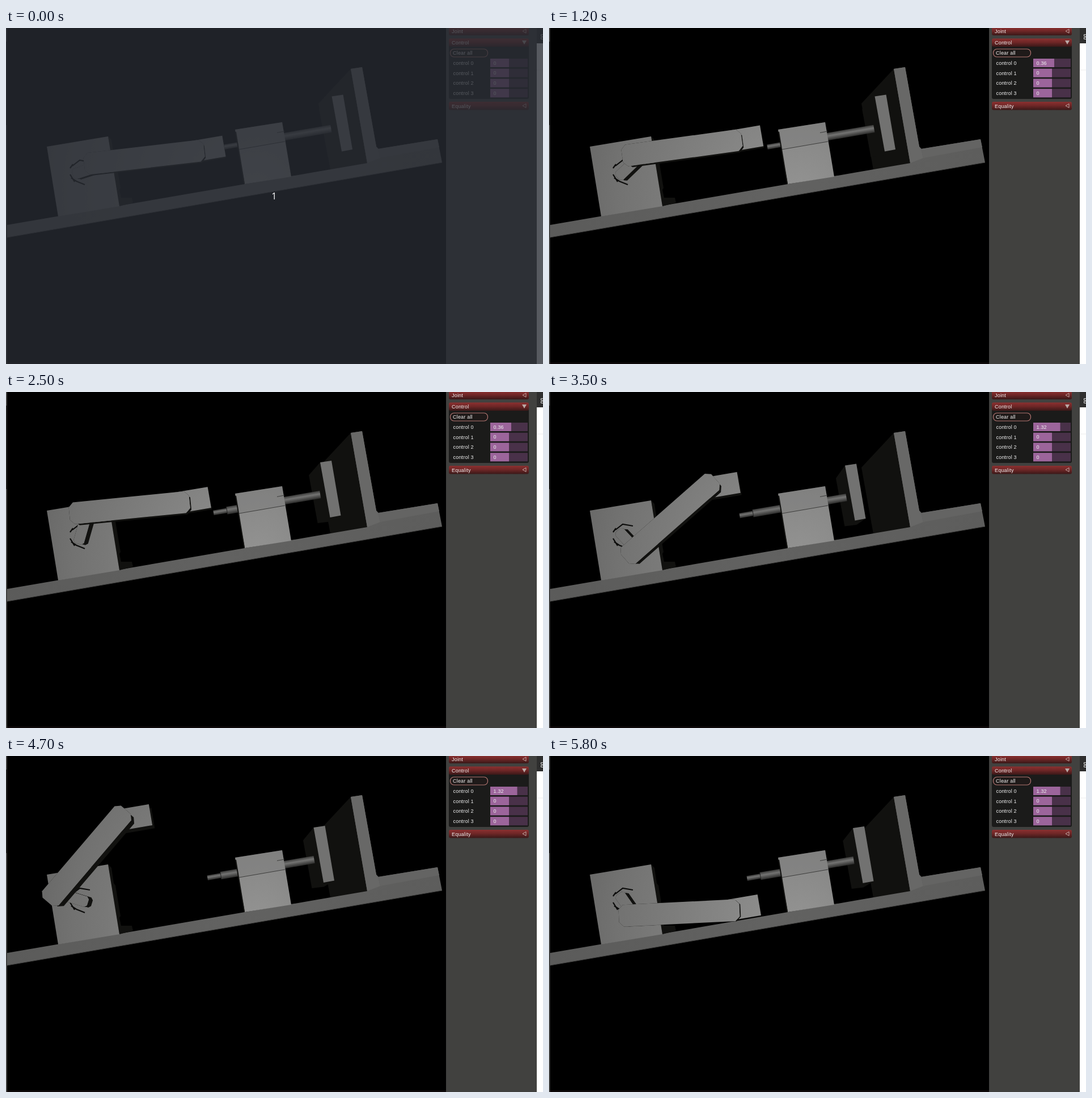
An HTML page that plays this animation: 947 by 592 pixels, repeating every 6 s.

```html
<!DOCTYPE html>
<html lang="en">
<head>
<meta charset="utf-8">
<title>Slider crank</title>
<style>
html, body { margin: 0; width: 100%; height: 100%; overflow: hidden; background: #000; }
svg { display: block; width: 947px; height: 592px; }
text { font: 9px "Liberation Sans", Arial, sans-serif; letter-spacing: .2px; fill: #f0f0f0; }
.dark { fill: #11110f; }
.lit { fill: url(#light); }
.hub { fill: none; stroke: #0c0c0b; stroke-width: 2.2; }
</style>
</head>
<body>
<svg viewBox="0 0 947 592" xmlns="http://www.w3.org/2000/svg">
  <defs>
    <radialGradient id="light" gradientUnits="userSpaceOnUse" cx="440" cy="290" r="460">
      <stop offset="0" stop-color="#939392"/>
      <stop offset=".3" stop-color="#858584"/>
      <stop offset=".7" stop-color="#727271"/>
      <stop offset="1" stop-color="#5e5e5d"/>
    </radialGradient>
    <linearGradient id="floor" x1="0" x2="1" y1="0" y2="0">
      <stop offset="0" stop-color="#5b5b5a"/>
      <stop offset=".5" stop-color="#626261"/>
      <stop offset="1" stop-color="#5d5d5c"/>
    </linearGradient>
    <linearGradient id="rod" x1="0" x2="0" y1="0" y2="1">
      <stop offset="0" stop-color="#3a3a39"/>
      <stop offset=".4" stop-color="#747473"/>
      <stop offset="1" stop-color="#2b2b2a"/>
    </linearGradient>
    <linearGradient id="red" x1="0" x2="0" y1="0" y2="1">
      <stop offset="0" stop-color="#8c3030"/>
      <stop offset=".45" stop-color="#702727"/>
      <stop offset="1" stop-color="#3a1818"/>
    </linearGradient>
  </defs>
  <rect width="947" height="592"/>
  <rect width="2" height="592" fill="#444"/>
  <rect y="24" width="1.5" height="147" fill="#161616"/>
  <rect x="2" y="589" width="774" height="3" fill="#0d0809"/>

  <path class="dark" d="M608 72L551 133L572 250L637 238Z"/>
  <path id="plateSide" class="dark"/>
  <path id="plate" fill="#727271"/>
  <g id="plunger">
    <rect x="-2" y="-4.3" width="26" height="8.6" fill="url(#rod)"/>
    <rect x="22" y="-6.7" width="167" height="13.4" fill="url(#rod)"/>
    <path d="M22 -6.5V6.5" stroke="#262625"/>
  </g>
  <path d="M2 347L637 238L608 72L628 69L653 209L657 213L761 196L769 237L2 369Z" fill="url(#floor)"/>
  <path d="M637 238L608 72L628 69L653 209L656 213L660 229Z" fill="#686867"/>
  <path d="M660 229L656 213L761 196L764 210Z" fill="#646463"/>
  <path d="M2 369L769 237" stroke="#3d3d3c" fill="none"/>

  <path class="dark" d="M404 179L407 184L422 268L421 275Z"/>
  <path class="lit" d="M404 179L487 166L503 262L421 275Z"/>
  <path d="M404 179L487 166L493 200L411 214Z" fill="#777" opacity=".35"/>
  <path d="M411 214L492 200M478 184.5L491 182" stroke="#3c3c3b" fill="none"/>
  <path d="M405 183L420 274" stroke="#11110f" stroke-width="2"/>

  <path class="dark" d="M180 191L186 197L190 224L193 228L202 282L200 285L203 299L222 299L224 308L200 314Z"/>
  <path class="lit" d="M72 209L180 191L200 314L92 332Z"/>
  <path class="hub" d="M113 247L118 240M117 243L130 233L148 236M113 258L121 271M115 264L124 270L139 276"/>
  <path id="crankSide" class="dark"/><path id="crank" class="lit"/>
  <path id="headSide" class="dark"/><path id="head" class="lit"/>
  <path id="couplerSide" class="dark"/><path id="coupler" class="lit"/>

  <rect x="776" width="160" height="592" fill="#41413f"/>
  <rect x="936" width="11" height="592" fill="#fff"/>
  <rect x="936" width="11" height="27" fill="#2e2e2e"/>
  <path d="M936 74h11" stroke="#ececec"/>
  <path d="M943.5 11.5h4v3h-4zM943.5 16.5h4v3h-4z" fill="none" stroke="#ddd"/>
  <g id="panel">
    <rect x="781" y="30" width="141" height="95" rx="3" fill="#1b1b1a"/>
    <rect x="783.5" y="37" width="66" height="14" rx="6.5" fill="#1f1a19" stroke="#b47672" stroke-width="1.2"/>
    <text x="788" y="47.2">Clear all</text>
  </g>
  <g id="cover">
    <rect width="947" height="592" fill="#282c34" opacity=".78"/>
    <text x="473" y="301.5" text-anchor="middle" style="font:16px 'Open Sans','Noto Sans',sans-serif;fill:#fff">1</text>
  </g>
</svg>
<script>
const $ = id => document.getElementById(id);
const RAD = Math.PI / 180, LOOP = 6000, STEP = 100;

// time, crank angle, coupler angle, plunger travel, power of the ease into the pose
const poses = [
  [1100, -18, -6.6, 0, 1],
  [1200, -44, -7.8, 0, 1],
  [2500, -74, -5.7, -20.5, 1],
  [3500, -313, -41.3, -52.5, 6],
  [3900, -438, 2.2, -32.5, 1],
  [4700, -883, -49.5, -32, 1.3],
  [5300, -1190, 1, -23, .7],
  [5800, -1385, -2.8, -38.5, 1]
];

function poseAt(t) {
  const i = poses.findIndex(p => p[0] >= t);
  if (i < 0) return poses[poses.length - 1];
  const b = poses[i], a = poses[i - 1] || b;
  const u = i ? (t - a[0]) / (b[0] - a[0]) : 1;
  return a.map((v, j) => {
    const k = j === 3 ? u : u ** b[4];
    return v + (b[j] - v) * k;
  });
}

// the slider is set once, then dragged to its final value
function controlAt(t) {
  if (t < 1200) return 0;
  const k = Math.min(1, Math.max(0, (t - 3000) / 300));
  return +(.36 + .96 * k).toFixed(2);
}

const path = pts => "M" + pts.map(p => p[0].toFixed(2) + " " + p[1].toFixed(2)).join("L") + "Z";
const shift = (pts, x, y) => pts.map(p => [p[0] + x, p[1] + y]);

// bar along the x axis with cut corners
const bar = (x0, x1, h, c) => [
  [x0 + c, -h], [x1 - c, -h], [x1, c - h], [x1, h - c],
  [x1 - c, h], [x0 + c, h], [x0, h - c], [x0, c - h]
];

function place(pts, x, y, deg) {
  const c = Math.cos(deg * RAD), s = Math.sin(deg * RAD);
  return pts.map(([a, b]) => [x + a * c - b * s, y + a * s + b * c]);
}

// front face plus side walls running to the vanishing point
function solid(id, pts, depth) {
  const back = pts.map(([x, y]) => [x + (400 - x) * depth, y + (300 - y) * depth]);
  const walls = pts.map((p, i) => {
    const j = (i + 1) % pts.length;
    return path([p, pts[j], back[j], back[i]]);
  });
  $(id).setAttribute("d", path(pts));
  $(id + "Side").setAttribute("d", walls.join(""));
}

const crankShape = bar(-14, 44, 9.5, 4);
const couplerShape = bar(-25, 188, 19.2, 8);
const headShape = [[0, -18.7], [60.8, -18.7], [60.8, 18.7], [0, 18.7]];
const plateShape = [[574.5, 120.5], [594.5, 117.5], [611, 214], [592, 217.5]];

function drawMachine(t) {
  const [, crank, rod, dx] = poseAt(t);
  const [pin] = place([[38.5, 0]], 126, 249, crank);
  const [hinge] = place([[163, 0]], ...pin, rod);
  solid("crank", place(crankShape, 131, 254, crank), .028);
  solid("head", place(headShape, ...hinge, -9.7), .03);
  solid("coupler", place(couplerShape, ...pin, rod), .03);

  const dy = -dx * .17, off = -22.4 - dx * .12;
  const f = shift(plateShape, dx, dy);
  $("plate").setAttribute("d", path(f));
  $("plateSide").setAttribute("d", path([
    f[0], f[1], f[2],
    [f[2][0] + off, f[2][1] + 11],
    [f[3][0] + off - 2, f[3][1] + 10],
    [f[0][0] + off, f[0][1] + 22.5]
  ]));
  $("plunger").setAttribute("transform", `translate(${387 + dx * .93} ${209.3 + dy * .93}) rotate(-9.7)`);
}

function buildPanel() {
  let s = "";
  const header = (y, name, open) => {
    s += `<rect x="781" y="${y}" width="141" height="14.5" rx="3" fill="url(#red)"/>
      <text x="786" y="${y + 10.6}">${name}</text>`;
    s += open
      ? `<path d="M910 ${y + 3.5}h8l-4 7z" fill="#b9a9a6"/>`
      : `<path d="M917 ${y + 3.5}v7l-6 -3.5z" fill="none" stroke="#c0a5a2"/>`;
  };
  header(-1.5, "Joint");
  header(18.5, "Control", true);
  header(130, "Equality");
  for (let i = 0; i < 4; i++) {
    const y = 54 + i * 17.75;
    s += `<text x="788.5" y="${y + 10.8}">control ${i}</text>
      <rect x="854" y="${y}" width="66" height="15" fill="#493149"/>
      <rect id="fill${i}" x="854" y="${y}" width="33" height="15" fill="#9c659b"/>
      <text id="num${i}" x="859.5" y="${y + 10.6}">0</text>`;
  }
  $("panel").insertAdjacentHTML("beforeend", s);
}

function draw(ms) {
  const t = Math.floor((ms % LOOP) / STEP) * STEP;
  const value = controlAt(t);
  drawMachine(t);
  $("fill0").setAttribute("width", 33 + value * 11);
  $("num0").textContent = value;
  $("cover").style.display = t < 100 ? "" : "none";
}

buildPanel();
const start = performance.now();
function tick() {
  draw(performance.now() - start);
  requestAnimationFrame(tick);
}
tick();
</script>
</body>
</html>
```
